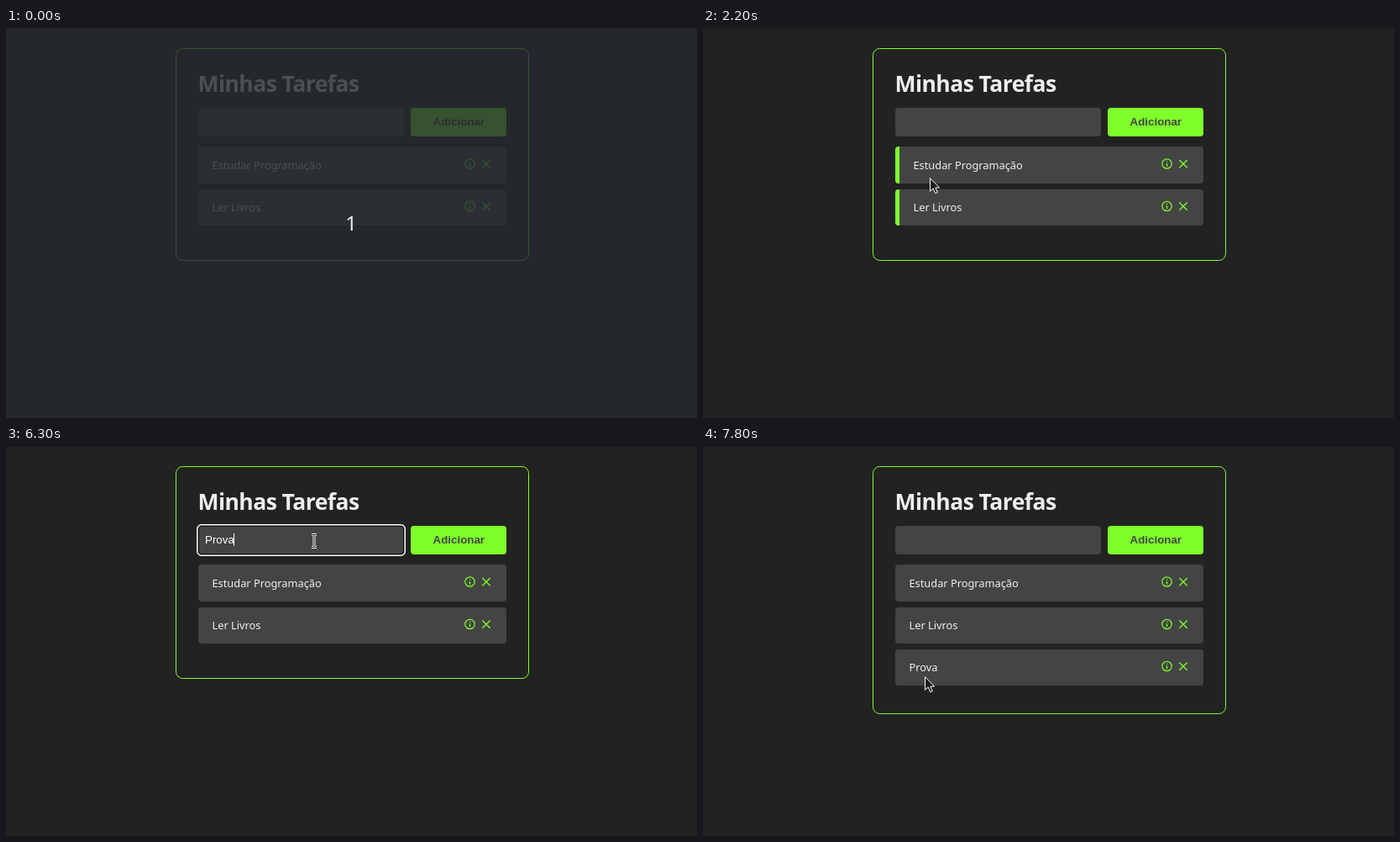
An HTML page with a canvas that plays this animation: 823x464 px, repeating every 8000 ms.

```html
<!DOCTYPE html>
<html lang="pt-BR">
<head>
<meta charset="utf-8">
<title>Minhas Tarefas</title>
<style>
  html, body { margin: 0; width: 100%; height: 100%; overflow: hidden; background: #222; }
  canvas { display: block; width: 823px; height: 464px; }
</style>
</head>
<body>
<canvas id="stage" width="823" height="464"></canvas>
<script>
const ctx = document.getElementById('stage').getContext('2d');
const LOOP = 8000, STEP = 100;
const GREEN = [126, 255, 42], GREY = [68, 68, 68];
const rgb = c => `rgb(${c.map(Math.round).join()})`;
const mix = (a, b, p) => a.map((v, i) => v + (b[i] - v) * p);
const LIME = rgb(GREEN), PANEL = rgb(GREY);
const SANS = '"Noto Sans", "Open Sans", sans-serif';
const UI = '"Liberation Sans", Arial, sans-serif';

const ITEMS = [
  { label: 'Estudar Programação', y: 141, h: 44, mark: [1400, 2700], from: 0 },
  { label: 'Ler Livros', y: 192, h: 43, mark: [1900, 3300], from: 0 },
  { label: 'Prova', y: 242, h: 43, mark: [0, 0], from: 6800 }
];
const TYPED = [[4900, 'P'], [5000, 'Pr'], [5300, 'Prov'], [5400, 'Prova'], [6800, '']];

// time, hot spot x, y, pointer shape; straight travel unless a key is held
const POINTER = [
  [100, 731, 262, 'arrow'], [300, 590, 218, 'arrow'], [500, 400, 160, 'arrow'],
  [700, 310, 129, 'beam', 1], [900, 288, 154, 'hand', 1], [1200, 284, 161, 'hand', 1],
  [1400, 274, 186, 'arrow'], [1500, 264, 209, 'hand', 1], [1800, 263, 213, 'hand', 1],
  [2100, 266, 196, 'arrow'], [2200, 270, 178, 'arrow', 1], [2400, 271, 172, 'arrow'],
  [2500, 270, 167, 'hand', 1], [2900, 273, 178, 'arrow'], [3000, 274, 190, 'arrow'],
  [3100, 270, 200, 'hand', 1], [3400, 270, 194, 'arrow'], [3500, 270, 183, 'arrow'],
  [3600, 274, 160, 'hand'], [3700, 279, 135, 'arrow'], [3800, 281, 114, 'beam', 1],
  [6200, 303, 114, 'beam'], [6400, 430, 111, 'beam'], [6500, 490, 108, 'hand'],
  [6700, 525, 105, 'hand', 1], [7400, 505, 125, 'hand'], [7500, 440, 180, 'arrow'],
  [7700, 270, 282, 'arrow'], [7800, 264, 274, 'arrow', 1]
];

const within = (t, a, b) => t >= a && t < b;

function box(x, y, w, h, r, fill, stroke, width = 1) {
  ctx.beginPath();
  ctx.roundRect(x, y, w, h, r);
  if (fill) { ctx.fillStyle = fill; ctx.fill(); }
  if (stroke) { ctx.strokeStyle = stroke; ctx.lineWidth = width; ctx.stroke(); }
}

function text(str, x, y, font, color, align = 'left', spacing = 0) {
  ctx.font = font;
  ctx.textAlign = align;
  ctx.letterSpacing = spacing + 'px';
  ctx.fillStyle = color;
  ctx.fillText(str, x, y);
}

function line(d, color, width) {
  ctx.strokeStyle = color;
  ctx.lineWidth = width;
  ctx.stroke(new Path2D(d));
}

function drawItem(item, t) {
  const { label, y, h } = item;
  const marked = within(t, ...item.mark);
  box(229, y, 367, h, 4, PANEL);
  if (marked) {
    ctx.save();
    ctx.beginPath();
    ctx.rect(229, y, 5, h);
    ctx.clip();
    box(229, y, 367, h, 4, LIME);
    ctx.restore();
  }
  text(label, marked ? 250.5 : 245.5, y + (h === 44 ? 27 : 26), '12.8px ' + SANS, '#f0f0f0');

  const cy = y + 20 - (h === 44 ? 0 : 0.5);
  ctx.beginPath();
  ctx.arc(552.5, cy + 0.5, 5.7, 0, Math.PI * 2);
  ctx.strokeStyle = LIME;
  ctx.lineWidth = 1.2;
  ctx.stroke();
  line(`M552.5 ${cy - 2.7}v1.3M552.5 ${cy}v3.7`, LIME, 1.3);
  line(`M567.3 ${cy - 4}l9.4 9.2m0 -9.2l-9.4 9.2`, LIME, 1.3);
}

function drawInput(t) {
  const focused = within(t, 700, 1300) || within(t, 3800, 6800);
  const value = TYPED.reduce((s, [at, v]) => t >= at ? v : s, '');
  box(229, 95, 245, 34, 4, PANEL);
  if (focused) {
    box(229.2, 95.2, 244.6, 33.6, 4, null, '#101010', 1.5);
    box(227.8, 93.8, 247.4, 36.4, 5, null, '#fff', 1.5);
  }
  text(value, 237, 116, '13.333px ' + UI, '#fff');
  if (focused && !within(t, 4400, 4900)) {
    ctx.fillStyle = '#fff';
    ctx.fillRect(Math.floor(237 + (value ? ctx.measureText(value).width : 0)), 104, 1, 15);
  }
}

function drawButton(t) {
  const ease = start => 1 - (1 - Math.min(1, Math.max(0, (t - start) / 300))) ** 2;
  const hover = ease(6500) - ease(7500);
  box(482, 95, 114, 34, 4, rgb(mix(GREEN, GREY, hover)));
  text('Adicionar', 539.3, 116, 'bold 13.333px ' + UI, rgb(mix(GREY, GREEN, hover)), 'center');
}

const ARROW = new Path2D('M.5 .7V16.3L4.2 12.9L6.8 18.7L9.3 17.6L6.8 12H11.6Z');
const HAND = new Path2D('M-1 1.6Q-1 0 .5 0T2 1.6V6.2Q3.5 5 4.8 6.6Q6.3 5.8 7.2 7.3' +
  'Q9 6.8 9 9V13Q8.8 15 7.6 17.2H.4Q-.4 15.4 -3.2 12.2Q-4.4 10.4 -3.4 9.7Q-2.4 9.2 -1 11Z');
const BEAM = 'M-3 -7.5H-1L0 -6.8L1 -7.5H3M0 -6.8V6.8M-3 7.5H-1L0 6.8L1 7.5H3';

function drawPointer(t) {
  const i = POINTER.findLastIndex(k => t >= k[0]);
  if (i < 0) return;
  const [at, x, y, shape, held] = POINTER[i];
  const next = POINTER[i + 1];
  const p = held || !next ? 0 : (t - at) / (next[0] - at);
  ctx.save();
  ctx.translate(Math.round(x + (next ? next[1] - x : 0) * p), Math.round(y + (next ? next[2] - y : 0) * p));
  ctx.lineJoin = 'round';
  if (shape === 'beam') {
    line(BEAM, '#fff', 3);
    line(BEAM, '#111', 1);
  } else {
    const hand = shape === 'hand', path = hand ? HAND : ARROW;
    ctx.fillStyle = hand ? '#fff' : '#1a1a1a';
    ctx.strokeStyle = hand ? '#222' : '#fff';
    ctx.lineWidth = 1;
    ctx.fill(path);
    ctx.stroke(path);
    if (hand) line('M2.2 6.5V10M4.8 7.2V10M7 8V10', '#777', 0.5);
  }
  ctx.restore();
}

function draw(t) {
  ctx.fillStyle = '#222';
  ctx.fillRect(0, 0, 823, 464);
  ctx.fillStyle = '#1b1b1b';
  ctx.fillRect(0, 0, 823, 1);
  box(202.5, 24.5, 420, t < 6800 ? 252 : 294, 8, null, LIME);
  text('Minhas Tarefas', 228.5, 76, 'bold 26.5px ' + SANS, '#eee', 'left', -0.55);
  drawInput(t);
  drawButton(t);
  ITEMS.filter(item => t >= item.from).forEach(item => drawItem(item, t));
  if (t < 100) {
    ctx.fillStyle = 'rgba(38, 42, 49, .81)';
    ctx.fillRect(0, 0, 823, 464);
    text('1', 411, 241, '24px ' + SANS, '#eee', 'center');
  }
  drawPointer(t);
}

const start = performance.now();
function tick() {
  const t = (performance.now() - start) % LOOP;
  draw(Math.floor(t / STEP) * STEP);
  requestAnimationFrame(tick);
}
tick();
</script>
</body>
</html>
```
